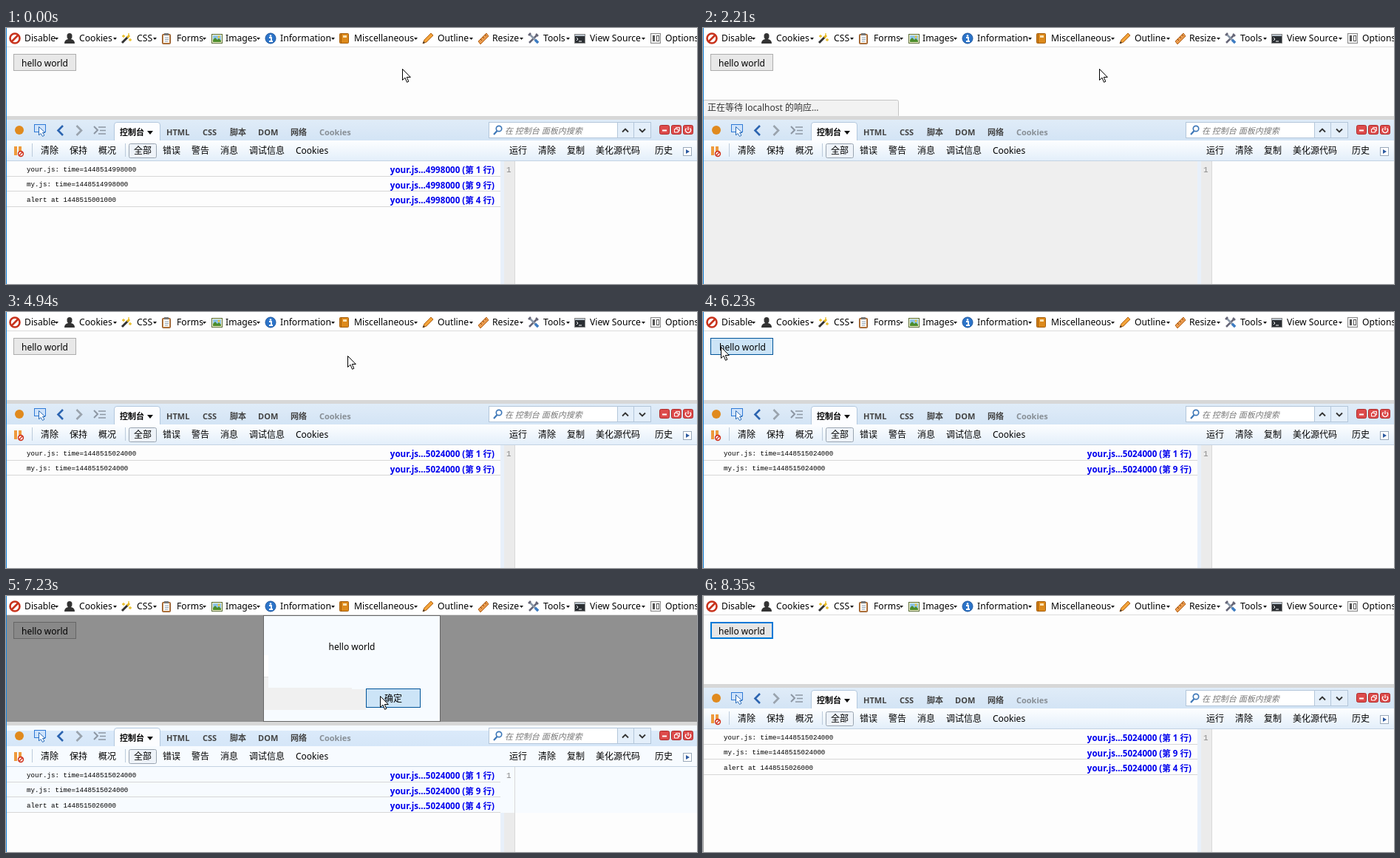
Write an HTML page that moves like this. It is 935 px wide and 346 px high and loops after 8.45 s.

```html
<!DOCTYPE html>
<html lang="zh-CN">
<head>
<meta charset="utf-8">
<style>
  html, body { margin: 0; width: 100%; height: 100%; overflow: hidden; background: #fdfdfd; }
  svg { display: block; }
  text { font: 12px "Noto Sans", "Noto Sans CJK SC", "Noto Sans CJK", sans-serif; white-space: pre; }
  .menu { font-size: 12.2px; }
  .tab { font-size: 11px; font-weight: 700; }
  .search { font-size: 11px; font-style: italic; }
  .log { font: 9.17px "Liberation Mono", "Noto Sans Mono", monospace; }
  .gutter { font: 11px "Liberation Mono", "Noto Sans Mono", monospace; }
  .link { font-size: 11.6px; font-weight: 700; text-anchor: end; }
  .mid { text-anchor: middle; }
</style>
</head>
<body>
<svg id="stage" width="935" height="346" viewBox="0 0 935 346"></svg>
<script>
const LOOP = 8450;
const SHIFT = 51;

const rect = (x, y, w, h, fill, extra = '') =>
  `<rect x="${x}" y="${y}" width="${w}" height="${h}" fill="${fill}" ${extra}/>`;
const box = (x, y, w, h, fill, stroke, r = 0) =>
  rect(x + .5, y + .5, w - 1, h - 1, fill, `stroke="${stroke}" rx="${r}"`);
const text = (x, y, s, cls = '', fill = '#000') =>
  `<text x="${x}" y="${y}" class="${cls}" fill="${fill}">${s}</text>`;
const path = (d, fill = 'none', stroke = 'none', width = 1) =>
  `<path d="${d}" fill="${fill}" stroke="${stroke}" stroke-width="${width}"/>`;
const circle = (x, y, r, fill, stroke = 'none', width = 1) =>
  `<circle cx="${x}" cy="${y}" r="${r}" fill="${fill}" stroke="${stroke}" stroke-width="${width}"/>`;
const group = (x, y, body, id = '') => `<g id="${id}" transform="translate(${x} ${y})">${body}</g>`;

// Menu icons are centred on their own origin.
const icons = {
  forbid: circle(0, 0, 6.5, '#fff', '#c8331d', 2.6) + path('M-4 4 4-4', 'none', '#c8331d', 2.6),
  person: path('M-7 7Q-7 2-2 1Q-4-1-3.5-4Q-3-7 0-7Q3-7 3.5-4Q4-1 2 1Q7 2 7 7Z', '#333'),
  wand: path('M-6 6 2-2', 'none', '#333', 3) + path('M1-1 4-4', 'none', '#e8b820', 3) +
    path('M-4-5V-1M-6-3H-2M3-7V-4M5 0V4M3 2H7', 'none', '#e9bd24', 1.3),
  clipboard: box(-6, -6, 12, 14, '#c98a4d', '#8d5426', 1) + rect(-4, -4, 8, 10, '#f7f7f7') +
    rect(-3, -7, 6, 3, '#777') + path('M-2-1H3M-2 1.5H3M-2 4H2', 'none', '#9ab'),
  picture: box(-7, -6, 15, 13, '#fffbd8', '#576b36') + rect(-5, -4, 11, 9, '#8fc5e8') +
    path('M-5 5V2L-2-1 1 2 3 0 6 3V5Z', '#4c8c2b') + circle(3, -2, 1.5, '#f4c631'),
  info: circle(0, 0, 7, '#2c74c9', '#1d559b') + circle(0, -3.5, 1.3, '#fff') +
    path('M-2-1H1V4M-2 4H3', 'none', '#fff', 1.8),
  book: box(-6, -7, 13, 14, '#dd8a1c', '#a45d0c', 1) + path('M-3.5-7V7', 'none', '#a45d0c') +
    rect(-1, -4, 5, 3, '#fbe3b4'),
  pencil: path('M-7 7-5 2 4-7 7-4-2 5Z', '#f2a33a', '#b2651a') + path('M-7 7-6 4-4 6Z', '#333'),
  ruler: path('M-7 4 4-7 7-3-4 8Z', '#e99a4d', '#b5651d') +
    path('M-4 1-2 3M-1-2 1 0M2-5 4-3', 'none', '#8d4a12'),
  tools: path('M-6 6 5-5', 'none', '#667', 2.5) + path('M-5-5 6 6', 'none', '#8a97a8', 2.5) +
    path('M-7-4-4-7M3-6 6-3', 'none', '#667', 2.5) + path('M2 2 6 6', 'none', '#3d7dc4', 3.5),
  terminal: box(-7, -6, 15, 13, '#2b2f33', '#888') + rect(-6, -5, 13, 2, '#b9c3cc') +
    path('M-4-1-2 1-4 3M-1 4H3', 'none', '#fff'),
  toggle: box(-7, -7, 14, 14, '#f2f2f2', '#888') + rect(-4, -4, 3, 8, '#555') +
    box(1, -4, 4, 8, '#fff', '#555')
};

// icon, its centre, label, label x, drop-down arrow x
const menu = [
  ['forbid', 12, 'Disable', 25, 66], ['person', 86, 'Cookies', 99, 145],
  ['wand', 163, 'CSS', 177, 199], ['clipboard', 217, 'Forms', 231, 266],
  ['picture', 285, 'Images', 297, 339], ['info', 358, 'Information', 371, 440],
  ['book', 457, 'Miscellaneous', 471, 552], ['pencil', 571, 'Outline', 584, 627],
  ['ruler', 646, 'Resize', 658, 695], ['tools', 714, 'Tools', 727, 758],
  ['terminal', 776, 'View Source', 790, 860], ['toggle', 879, 'Options', 892, 940]
];
const menuBar = rect(0, 0, 935, 25, '#fff') + rect(0, 25, 935, 1, '#dcdcdc') +
  menu.map(([icon, cx, label, x, arrow]) => group(cx, 14, icons[icon]) +
    text(x, 18, label, 'menu') + path(`M${arrow} 13h5l-2.5 3Z`, '#111')).join('');

const tabs = [[217, 'HTML'], [266, 'CSS'], [303, '脚本'], [341, 'DOM'], [385, '网络'], [424, 'Cookies']];
const tools = [[47, '清除'], [86, '保持'], [125, '概况'], [173, '全部'], [212, '错误'], [251, '警告'],
  [290, '消息'], [329, '调试信息'], [392, 'Cookies'], [681, '运行'], [720, '清除'], [759, '复制'],
  [798, '美化源代码'], [878, '历史']];

const tabBar = rect(1, 119, 934, 5, '#d7d7d7') + rect(1, 124, 934, 28, 'url(#tabFill)', 'id="tabBack"') +
  circle(18, 138, 6, '#e08a1e') +
  box(38, 130, 16, 11, '#cfe3fb', '#2f7ad6') +
  path('M44.500 133.500V145L47 142.500 49.500 146.500 52 145 49.500 141.500H53Z', '#fff', '#2569b8') +
  path('M77 132 70.5 138.5 77 145', 'none', '#2b64b0', 2.6) +
  path('M95.5 132 102 138.5 95.5 145', 'none', '#9aa3ad', 2.6) +
  path('M119 133 124 138 119 143', 'none', '#8d97a3', 2) + path('M125 134H135M127 138.5H135M125 143H135', 'none', '#8d97a3', 1.6) +
  path('M146.5 152V131Q146.5 127.5 150 127.5H205Q208.5 127.5 208.5 131V152', '#fcfdff', '#b3c8de') +
  text(154, 145, '控制台', 'tab') + path('M191 139h8l-4 5Z', '#111') +
  tabs.map(([x, s]) => text(x, 145, s, 'tab', s === 'Cookies' ? '#888f96' : '#444')).join('') +
  box(653, 127, 175, 22, '#fff', '#b3c6da') + circle(667, 136, 3.7, '#fff', '#3f78b8', 1.7) +
  path('M664.5 139 660 144', 'none', '#3f78b8', 2.2) + text(675, 142.5, '在 控制台 面板内搜索', 'search', '#777') +
  box(827, 127, 23, 22, '#e4effa', '#b3c6da') + box(849, 127, 24, 22, '#e4effa', '#b3c6da') +
  path('M834 140.5 838 136.5 842 140.5M857 136.5 861 140.5 865 136.5', 'none', '#333', 1.8) +
  [884, 900, 916].map(x => box(x, 131, 14, 13, '#dd4b4b', '#b02a2a', 2)).join('') +
  path('M888 138.5H894', 'none', '#fff', 2) + path('M904.5 136.5H909.5V141H904.5ZM906.5 136V134.5H911.5V139H910', 'none', '#fff') +
  path('M920.5 135.5A3.5 3.5 0 1 0 925.5 135.5M923 133.5V138', 'none', '#fff', 1.3);

const toolBar = rect(1, 152, 934, 28, 'url(#toolFill)', 'id="toolBack"') + rect(1, 179, 934, 1, '#c3d3e3') +
  rect(11, 160, 4, 12, '#ee9a3c') + rect(17, 160, 4, 12, '#ee9a3c') +
  circle(20, 170, 3.4, '#fff', '#d0321e', 1.6) + path('M18 172 22 168', 'none', '#d0321e', 1.4) +
  rect(35, 156, 1, 18, '#bccbdb') + rect(161, 156, 1, 18, '#bccbdb') +
  box(166, 156, 38, 20, '#eef3f9', '#9aa5b1', 2) +
  tools.map(([x, s]) => text(x, 170, s)).join('') +
  box(916, 161, 12, 12, '#fff', '#9aa9ba') + path('M920 164 925 167 920 170Z', '#2d5aa0');

const rows = [200, 220, 241].map((y, i) => `<g id="row${i}">` +
  text(28, y - 6, '', 'log') + text(661, y - 4 + (i === 1), '', 'link', '#00e') +
  rect(1, y, 668, 1, '#d7d7d7') + '</g>').join('');

const consolePane = rect(1, 180, 934, 220, '#fdfdfd') +
  rect(1, 180, 672, 220, '#efefef', 'id="blank"') +
  rect(669, 180, 5, 220, '#e8f0fa') + rect(674, 180, 14, 220, '#ebebeb') +
  rect(1, 180, 934, 62, '#f7fbff', 'id="tint"') +
  rect(688, 180, 1, 220, '#d9d9d9') + text(677, 195, '1', 'gutter', '#888') + rows;

const page = rect(0, 26, 935, 150, '#fdfdfd', 'id="pageFill"') +
  '<rect id="button"/>' + text(21, 51.5, 'hello world').replace('<text', '<text id="buttonText"') +
  `<g id="status">${box(0, 97, 265, 24, '#f2f2f2', '#c4c4c4', 2)}${text(6, 112, '正在等待 localhost 的响应…', '', '#333')}</g>`;

const dialog = `<g id="dialog">${box(348, 26, 240, 144, '#f7fbff', '#666')}` +
  `<g id="trail1">${rect(349, 80, 6, 30, '#fff')}${rect(349, 109, 6, 1, '#dfdfdf')}${rect(349, 110, 6, 33, '#f0f0f0')}</g>` +
  rect(349, 124, 119, 30, '#f0f0f0', 'id="trail2"') + rect(456, 126, 31, 28, '#f0f0f0', 'id="trail3"') +
  text(468, 73, 'hello world', 'mid') + '<rect id="okay"/>' + text(524, 142.5, '确定', 'mid') + '</g>';

const arrow = path('M.5.5V15.5L4 12.2 6.5 18.3 8.8 17.3 6.3 11.5H11.3Z', '#fff', '#000');
const beam = path('M.5.5H2.5L3.5 1.5 4.5.5H6.5M3.5 1.5V14.5M.5 15.5H2.5L3.5 14.5 4.5 15.5H6.5', 'none', '#000');

const stage = document.getElementById('stage');
stage.innerHTML = `<defs>
  <linearGradient id="tabFill" x2="0" y2="1"><stop stop-color="#e0ecf8"/><stop offset="1" stop-color="#d3e4f5"/></linearGradient>
  <linearGradient id="tabGlow" x2="0" y2="1"><stop offset=".25" stop-color="#f5faff"/><stop offset=".25" stop-color="#dbeafa"/><stop offset="1" stop-color="#d5e6f8"/></linearGradient>
  <linearGradient id="toolFill" x2="0" y2="1"><stop stop-color="#fdfeff"/><stop offset="1" stop-color="#e2eefa"/></linearGradient>
  </defs>` + rect(0, 0, 935, 346, '#fdfdfd') + page + dialog +
  group(0, 0, tabBar + toolBar + consolePane, 'panel') + menuBar +
  rect(0, 0, 1, 346, '#1883d7', 'id="edge"') +
  `<g id="cursor"><g id="arrow">${arrow}</g><g id="beam">${beam}</g></g>`;

const $ = id => document.getElementById(id);
const show = (id, on) => $(id).setAttribute('display', on ? 'inline' : 'none');
const set = (id, attrs) => Object.entries(attrs).forEach(([k, v]) => $(id).setAttribute(k, v));

const moves = [
  [0, 536, 55], [4640, 504, 55], [4790, 476, 59], [4940, 462, 59], [5630, 189, 57], [5780, 74, 53],
  [5930, 24, 47], [6510, 190, 90], [6630, 343, 124], [6780, 456, 135], [6930, 505, 135],
  [7080, 506, 135], [7380, 508, 134], [7530, 641, 146], [7680, 766, 222], [7800, 854, 295], [7950, 871, 321]
];

const styles = {
  normal: ['#e8e8e8', '#adadad', 1], hover: ['#e5f1fb', '#0078d7', 1],
  pressed: ['#cce4f7', '#005499', 1], focus: ['#e6e6e6', '#0078d7', 2],
  dimmed: ['#888', '#666', 1], primary: ['#f7fbff', '#0078d7', 2]
};
function styleButton(id, x, y, w, h, name) {
  const [fill, stroke, width] = styles[name];
  set(id, { x: x + width / 2, y: y + width / 2, width: w - width, height: h - width,
    fill, stroke, 'stroke-width': width });
}

function update(t) {
  const modal = t >= 6360 && t < 7380;
  const reloading = t >= 1940 && t < 3800;
  const first = t < 1940;

  const [stamp, alertTime] = first ? ['1448514998000', '1448515001000'] : ['1448515024000', '1448515026000'];
  const logs = [`your.js: time=${stamp}`, `my.js: time=${stamp}`, `alert at ${alertTime}`];
  logs.forEach((log, i) => {
    const [label, link] = $('row' + i).children;
    label.textContent = log;
    link.textContent = `your.js...${stamp.slice(-7)} (第 ${[1, 9, 4][i]} 行)`;
    show('row' + i, !reloading && (i < 2 || first || t >= 6360));
  });
  show('blank', reloading);
  show('status', t >= 2210 && t < 3800);

  const pressed = t >= 6230 && t < 6360;
  styleButton('button', 10, 35, 85, 23,
    modal ? 'dimmed' : t >= 7380 ? 'focus' : pressed ? 'pressed' : t >= 5930 ? 'hover' : 'normal');
  set('buttonText', { x: pressed ? 22 : 21 });

  set('pageFill', { fill: modal ? '#909090' : '#fdfdfd' });
  set('panel', { transform: `translate(0 ${modal ? SHIFT : 0})` });
  set('tabBack', { fill: modal ? 'url(#tabGlow)' : 'url(#tabFill)' });
  set('toolBack', { fill: modal ? '#f7fbff' : 'url(#toolFill)' });
  show('tint', modal);
  show('dialog', modal);
  show('trail1', t >= 6630);
  show('trail2', t >= 6780);
  show('trail3', t >= 6930);
  styleButton('okay', 487, 125, 74, 26, t >= 7230 ? 'pressed' : t >= 6930 ? 'hover' : 'primary');

  const [, x, y] = moves.filter(m => m[0] <= t).pop();
  const overEditor = t >= 7680;
  set('cursor', { transform: `translate(${x} ${y})` });
  show('cursor', t < 8070);
  show('arrow', !overEditor);
  show('beam', overEditor);
  set('edge', { fill: t >= 8350 ? '#a5a5a5' : '#1883d7' });
}

const start = performance.now();
function tick() {
  update((performance.now() - start) % LOOP);
  requestAnimationFrame(tick);
}
tick();
</script>
</body>
</html>
```
